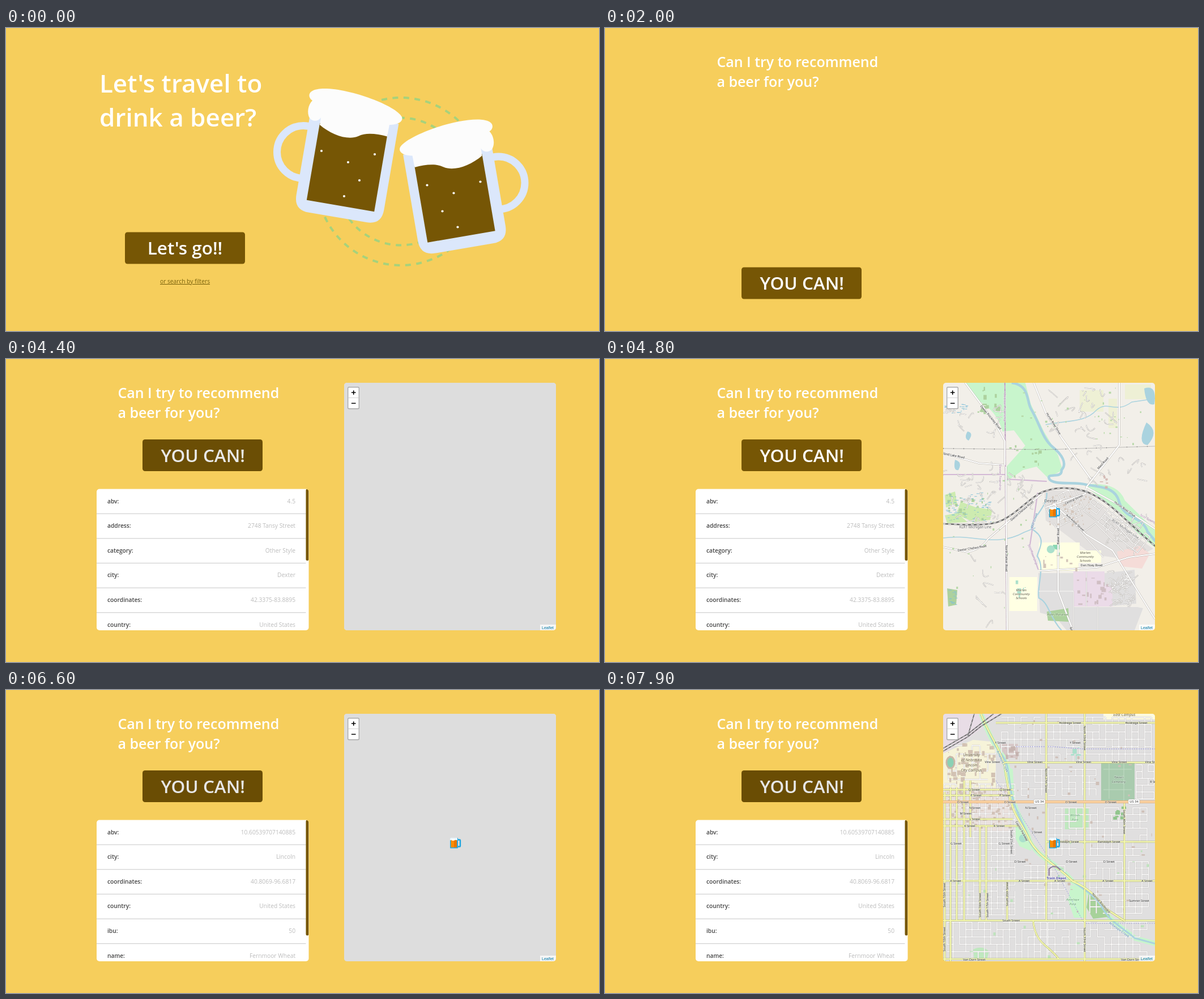
An HTML page that plays this animation: 1047x535 px, repeating every 8 s.

```html
<!DOCTYPE html>
<html lang="en">
<head>
<meta charset="utf-8">
<title>Let's travel to drink a beer?</title>
<style>
html, body { margin: 0; width: 100%; height: 100%; overflow: hidden; background: #f6ce5c; }
svg { display: block; width: 1047px; height: 535px; font-family: "Open Sans", sans-serif; }
.bold { font-weight: 600; }
.map { font-family: "Noto Sans", sans-serif; stroke-linejoin: round; }
.map text { paint-order: stroke; stroke: #fff; stroke-opacity: .65; stroke-width: 1px; text-anchor: middle; }
</style>
</head>
<body>
<svg id="stage" viewBox="0 0 1047 535"></svg>
<script>
const BROWN = '#765605';
const text = (x, y, s, size, fill, attr = '') =>
  `<text x="${x}" y="${y}" font-size="${size}" fill="${fill}" ${attr}>${s}</text>`;
const rect = (x, y, w, h, fill, r = 0, attr = '') =>
  `<rect x="${x}" y="${y}" width="${w}" height="${h}" rx="${r}" fill="${fill}" ${attr}/>`;
const area = (d, fill) => `<path d="${d}" fill="${fill}"/>`;
const line = (d, color, w, attr = '') =>
  `<path d="${d}" fill="none" stroke="${color}" stroke-width="${w}" ${attr}/>`;
const road = (d, w = 2, fill = '#fff', edge = '#b3afaa') => line(d, edge, w + 0.9) + line(d, fill, w);
const label = (x, y, s, angle = 0, fill = '#222', size = 5.3, attr = '') =>
  text(0, 0, s, size, fill, `dy=".35em" transform="translate(${x} ${y}) rotate(${angle})" ${attr}`);
const stack = (x, y, words, fill, size = 6.2, step = 7.5) =>
  words.map((w, i) => label(x, y + i * step, w, 0, fill, size, 'font-style="italic"')).join('');
const group = (id, body, attr = '') => `<g id="${id}" ${attr}>${body}</g>`;

let seed = 11;
const rnd = () => (seed = (seed * 16807) % 2147483647) / 2147483647;
const num = v => v.toFixed(1);

// street grid with random gaps
function grid(x0, y0, x1, y1, dx, dy, gap) {
  let d = '';
  for (let y = y0; y <= y1; y += dy)
    for (let x = x0; x <= x1; x += dx) {
      if (rnd() > gap && x + dx <= x1 + 1) d += `M${num(x)} ${num(y)}h${dx}`;
      if (rnd() > gap && y + dy <= y1 + 1) d += `M${num(x)} ${num(y)}v${dy}`;
    }
  return d;
}

// winding residential lanes
function lanes(x, y, w, h, n) {
  let d = '';
  const r = () => num((rnd() - 0.5) * 32);
  for (let i = 0; i < n; i++)
    d += `M${num(x + rnd() * w)} ${num(y + rnd() * h)}q${r()} ${r()} ${r()} ${r()}`;
  return d;
}

function blocks(x, y, w, h, n, fill, size = 4) {
  let d = '';
  for (let i = 0; i < n; i++) {
    const a = num(1 + rnd() * size), b = num(1 + rnd() * size);
    d += `M${num(x + rnd() * w)} ${num(y + rnd() * h)}h${a}v${b}h-${a}z`;
  }
  return area(d, fill);
}

// short level strokes for wetland
function marsh(x, y, w, h, n) {
  let d = '';
  for (let i = 0; i < n; i++) d += `M${num(x + rnd() * w)} ${num(y + rnd() * h)}h${num(2 + rnd() * 4)}`;
  return line(d, '#7fbfd9', 0.9);
}

function mug() {
  const dots = [[557, 217], [604, 237], [651, 223], [624, 269], [597, 297]];
  return '<circle cx="525" cy="219" r="46.5" fill="none" stroke="#dbe7fb" stroke-width="13"/>' +
    '<g transform="translate(590.5 314) rotate(9.7)">' +
    area('M-80 -160H77V-6Q77 21 50 21H-53Q-80 21 -80 -6Z', '#dbe7fb') +
    rect(-60.5, -138, 121, 138, BROWN) + '</g>' +
    area('M536 122C533 112 545 107 562 107C610 107 690 138 699 157C702 166 690 171 677 171' +
      'L673 191.500C655 187 636 184 622 191C604 199 575 189 554 171L556 158C552 165 541 166 536 159' +
      'C531 150 533 136 541 128C539 127 537 125 536 122Z', '#fcfcfc') +
    dots.map(([x, y]) => `<circle cx="${x}" cy="${y}" r="2.1" fill="#fcfcfc"/>`).join('');
}

const ring = r => `<circle cx="697" cy="271" r="${r}" fill="none" stroke="#a7d27b" stroke-width="4" stroke-dasharray="10 9.5"/>`;

const button = (id, s, x) => group(id, rect(0, 0, 212, 56, BROWN, 4.5) +
  text(x, 39.5, s, 31.5, '#fff', 'class="bold" text-anchor="middle"'));

const home = text(165, 114, "Let's travel to", 44, '#fff', 'class="bold"') +
  text(165, 174, 'drink a beer?', 44, '#fff', 'class="bold"') +
  `<g transform="translate(210 360.5)">${button('go', "Let's go!!", 106)}</g>` +
  text(316, 451, 'or search by filters', 10.24, '#77600a', 'text-anchor="middle" text-decoration="underline"') +
  ring(148) + ring(112.5) + mug() +
  `<g transform="translate(1394.5 54.5) scale(-1 1)">${mug()}</g>`;

function card(rows, thumb) {
  return rows.map(([key, value], i) => {
    const y = 229.5 + i * 43.65;
    return (i ? rect(160, y - 0.6, 369.5, 1.2, '#d0d0d0') : '') +
      text(179, y + 25, key + ':', 10.24, '#444', 'class="bold"') +
      text(511, y + 25, value, 10.24, '#bcbcbc', 'text-anchor="end"');
  }).join('') + rect(529.5, 229.5, 5, thumb, BROWN, 2.5);
}

const firstBeer = [['abv', '4.5'], ['address', '2748 Tansy Street'], ['category', 'Other Style'],
  ['city', 'Dexter'], ['coordinates', '42.3375-83.8895'], ['country', 'United States']];
const secondBeer = [['abv', '10.60539707140885'], ['city', 'Lincoln'], ['coordinates', '40.8069-96.6817'],
  ['country', 'United States'], ['ibu', '50'], ['name', 'Fernmoor Wheat']];

function dexterMap() {
  const water = '#aad3df', park = '#c8f5cc', wood = '#add19e', purple = '#a47fa6', school = '#ffffe3';
  const river = 'M718 42C750 46 744 74 752 88C768 115 772 140 790 155C806 168 817 184 806 196C808 212 780 200 784 211' +
    'C790 224 830 216 850 222C880 226 902 228 908 253C918 284 948 276 958 305L972 322';
  const rail = 'M596 291C630 292 665 295 690 289C720 280 742 252 766 238C790 225 825 225 852 235C892 252 915 282 972 331';
  const main = 'M597 166L660 184L704 187M636 42L688 112L706 145V187M757 42L778 95L806 139L858 212M908 42V152L850 226L848 238' +
    'L778 262M597 332L640 341Q664 336 676 318L730 272L771 238M786 250L850 310L896 338L971 459' +
    'M800 262V410L826 479M708 190L710 479M766 374L868 368L925 350L971 344M850 226L908 258L971 300';
  const small = lanes(604, 65, 90, 70, 14) + lanes(604, 195, 95, 90, 26) + lanes(785, 55, 115, 80, 22) +
    lanes(872, 270, 95, 65, 26) + lanes(885, 375, 55, 65, 34) + lanes(690, 200, 70, 60, 14) +
    lanes(830, 160, 130, 55, 16) + lanes(640, 340, 120, 130, 8);
  const town = (angle, d) => `<g transform="rotate(${angle} 815 262)">${road(d, 1.2)}</g>`;
  return rect(597, 42, 374, 437, '#f2efe9') +
    area('M838 55h42v38h-42zM889 70h15v52h-15zM918 45h46v26h-46z', '#eef0d5') +
    area('M634 42H742L752 80L775 128L800 170L808 196L782 210L762 190L738 196L708 217L707 192L742 153L722 126L702 128Q692 92 660 74Z', park) +
    area('M846 222Q905 215 918 250L971 302V333L945 312L910 275Z', park) +
    area('M776 232L850 232L905 290L968 335L930 355L860 345L800 300L778 285Z', '#e3e0de') +
    area('M765 378H828V438H940L950 440L935 479H815L795 455L768 448Z', '#e0dfdf') +
    area('M827 375H882V400H896V437H827Z', '#ebdbe8') +
    area('M882 378L935 372L938 432L896 436V400H882Z', '#e0dfdf') +
    area('M904 340L945 330L962 344L948 370L910 366Z', '#f5dcd8') +
    area('M766 324h72v14h38v22h-40v14h-70zM714 385h49v60h-49z', school) +
    area('M600 240L618 234L622 258L602 262ZM628 252L655 262L684 266L680 284L650 288L620 274ZM600 276L622 272L640 288L604 290Z', '#cdebb0') +
    area('M604 405L622 408L620 434L606 437ZM780 446L818 440L820 464L782 462Z', wood) +
    blocks(600, 236, 82, 50, 30, wood, 5) + blocks(655, 44, 40, 50, 14, wood, 8) + blocks(712, 150, 60, 40, 12, wood, 5) +
    marsh(598, 236, 82, 52, 75) + marsh(598, 80, 40, 16, 26) + marsh(606, 408, 14, 26, 14) +
    area('M952 52Q975 44 970 80Q955 84 952 52ZM956 112Q980 128 958 152Q938 150 956 112ZM618 178q14 4 6 18q-10 2 -6 -18ZM640 128q12 2 2 16q-9 -4 -2 -16Z', water) +
    line('M778 116C820 108 848 112 868 90C888 72 900 98 930 76L971 70M597 316C650 308 690 334 740 306L760 298', water, 1.5) +
    line('M780 236C782 262 752 280 753 300C782 316 766 335 763 348C778 368 762 400 766 422C784 430 784 455 806 479', water, 2.2) +
    line(river, water, 4.5) +
    blocks(785, 326, 14, 18, 5, '#8bd8b4', 9) + blocks(723, 388, 36, 28, 7, '#aae0cb', 8) +
    '<circle cx="787" cy="336" r="7" fill="#aae0cb"/>' +
    line('M706 42L709 479M597 204H706M706 212L780 216M764 236L750 330L765 372', '#d3b9d5', 2.2) +
    line('M706 42L709 479', '#a783a9', 0.8, 'stroke-dasharray="5 2 1 2"') +
    line('M597 158L780 160L971 154', '#999', 0.6) + line('M597 158L780 160L971 154', '#777', 1.6, 'stroke-dasharray="1 17"') +
    road(small, 1) +
    town(-27, grid(782, 236, 842, 286, 10, 10, 0.2)) + town(38, grid(842, 212, 965, 248, 11, 9, 0.25)) +
    road('M838 303L880 350M866 290L916 340M866 290L846 305M890 276L932 326M766 410H827V479M850 375V437M870 437V479', 1.3) +
    road(main, 2.2) +
    blocks(780, 240, 75, 52, 55, '#d3c5ba', 3) + blocks(832, 380, 56, 54, 22, '#d0bfc4', 7) +
    blocks(772, 345, 60, 25, 9, '#d3c5ba', 7) + blocks(872, 205, 16, 20, 8, '#d3b6b0', 5) +
    blocks(735, 50, 210, 100, 34, '#b7d9a8', 3) + blocks(600, 200, 150, 245, 28, '#b7d9a8', 3) +
    line(rail, '#707070', 2.6) + line(rail, '#fff', 1.2, 'stroke-dasharray="5 5"') +
    label(706, 85, 'Webster Township', 90, purple, 5.8) + label(698, 209, 'Dexter Township', 90, purple, 5.8) +
    label(755, 345, 'Scio Township', 68, purple, 5.8) + label(962, 284, 'Scio Township', 28, purple, 5.8) +
    label(681, 103, 'Dexter Pinckney Road', 50) + label(792, 114, 'Huron River Drive', 58) +
    label(879, 184, 'Mast Road', -47) + label(614, 170, 'Island Lake Road', 11) +
    label(828, 248, 'Central Street', -25) + label(830, 289, 'Ann Arbor Street', 43) +
    label(736, 268, 'Dexter Chelsea Road', -41) + label(648, 334, 'Dexter Chelsea Road', -9) +
    label(654, 297, 'KLRT Michigan Line', 0, '#666', 6.2) + label(919, 300, 'KLRT Michigan Line', 35, '#666', 6.2) +
    label(758, 285, 'Mill Creek', -72, '#4f80a5', 6) + label(800, 313, 'Baker Road', -90) +
    label(709, 352, 'North Parker Road', 90) + label(859, 364.5, 'Dan Hoey Road') +
    label(918, 265, 'Huron River Drive', 35) + label(829, 486, 'Baker Road', 60) +
    label(787, 250, 'Dexter', 0, '#555', 7.4) +
    stack(848, 342, ['Marlen', 'Community', 'Schools'], '#5f5b38', 5.9, 7) +
    stack(735, 408, ['Marlen', 'Community', 'Schools'], '#5f5b38', 5.9, 7) +
    stack(799, 451, ['Alder Preserve'], '#4d7a3c', 5.9);
}

function lincolnMap() {
  const park = '#c8f5cc', water = '#aad3df', yellow = '#f4f8ae', edge = '#aeb265';
  const creek = 'M664 42C676 74 686 96 700 114C716 132 712 165 720 192C727 222 742 238 750 268C766 298 800 306 826 338' +
    'C845 352 868 364 880 388C895 412 920 424 935 438L972 448';
  const parkway = 'M718 200C722 222 740 240 750 266C768 298 800 310 826 338C850 348 866 362 884 386L918 408';
  const rail = 'M597 108L640 83L664 64L700 42M597 103L640 78L686 42M640 83L652 42';
  const row = (y, s, ...xs) => xs.map(x => label(x, y, s)).join('');
  const up = (s, x, y, a = -90) => label(x, y, s, a);
  const shield = x => rect(x - 10, 193, 20, 8.5, '#fff', 1.5, 'stroke="#aaa" stroke-width=".5"') + label(x, 197.3, 'US 34', 0, '#333', 5.8);
  return rect(597, 42, 374, 437, '#e0dfdf') +
    area('M597 42H700L640 86L597 112Z', '#e8dde6') + area('M597 112L650 88L690 92V172H597Z', '#f6f3d9') +
    area('M597 172H718V250H597Z', '#eae1de') + area('M880 42H971V52H880Z', '#fdfbe0') +
    area('M697 95h32v25h-32z', '#d7c8c8') +
    line(creek, park, 9) +
    area('M702 130L720 140L722 175L708 165ZM724 236L744 250L752 284L732 276L722 256ZM822 344L850 352V402H828L818 372Z', park) +
    area('M812 207h42v39h-42zM650 458q18 -8 28 4l-4 14h-22z', '#bfe8bf') +
    area('M854 360L878 376L892 400L862 404L850 384Z', '#a7d29a') +
    area('M876 129h59v68h-59z', '#a9cbae') + line('M880 140h50M890 130v62M880 176h50M916 130v66', '#c1dcc4', 1) +
    road(grid(599, 166, 733, 404, 10.4, 10.5, 0.1) + grid(604, 410, 780, 474, 11, 13, 0.16) +
      grid(700, 48, 968, 125, 11.5, 13, 0.2) + grid(735, 140, 872, 196, 12, 11.5, 0.18) +
      grid(782, 208, 968, 300, 12.5, 12, 0.24) + grid(856, 303, 968, 404, 11.5, 11.4, 0.2) +
      grid(782, 410, 968, 474, 12.5, 13, 0.2) + grid(740, 310, 812, 404, 12, 10.5, 0.18) +
      grid(938, 132, 970, 194, 10.5, 12, 0.2) + grid(606, 98, 690, 160, 14, 15, 0.4), 1.4, '#fff', '#bfbcb9') +
    blocks(600, 92, 88, 74, 65, '#d2c2b3', 8) + blocks(600, 172, 118, 74, 110, '#d2c2b8', 5) +
    blocks(700, 96, 26, 22, 8, '#c6b4b0', 9) + blocks(720, 48, 245, 140, 26, '#cfc0b8', 5) +
    blocks(730, 210, 235, 190, 26, '#cfc0b8', 5) + blocks(610, 260, 350, 210, 26, '#bfe3bd', 5) +
    blocks(897, 203, 18, 24, 9, '#91c58d', 8) +
    '<ellipse cx="610" cy="128" rx="7" ry="10" fill="#8bd0b4" stroke="#c9b7a8" stroke-width="3"/>' +
    '<circle cx="738" cy="262" r="7" fill="#aae0cb"/>' + blocks(822, 100, 18, 14, 5, '#aae0cb', 9) +
    line('M726 100H790L842 104H971', '#8d8dde', 1, 'stroke-dasharray="2 2"') +
    line('M690 160L724 206L786 300L846 412H971', '#9a9ae0', 0.9, 'stroke-dasharray="2 2"') +
    line(creek, water, 3) +
    road('M690 58H971M700 128H971M597 176H720M597 186H720M597 228H720M597 240H732M780 268H971' +
      'M597 337H971M597 407H971M597 475H971M779 42V407M847 42V479M917 198V407M600 180V479' +
      'M610 172V479M621 172V407M634 160V407M645 160V260M662 240V407M673 240V407M710 337V407' +
      'M756 407Q758 435 776 450T802 476', 2.1, yellow, edge) +
    road(parkway, 2.6, yellow, edge) +
    road('M664 42C676 80 704 108 708 150L716 200', 2.4, yellow, edge) +
    road('M597 197.5H971', 3.6, '#fbd2a2', '#d69a5c') +
    line(rail, '#686868', 1.7) + line(rail, '#ddd', 0.7, 'stroke-dasharray="4 4"') +
    line('M784 328V316Q794 306 804 318', '#8e7a9d', 2) +
    row(58, 'Holdrege Street', 821, 938) + row(93, 'Y Street', 698, 830) +
    row(127.5, 'Vine Street', 684, 759, 845, 908, 967) + row(176, 'Q Street', 652, 707) +
    row(186, 'P Street', 655, 706) + row(198, 'O Street', 632, 715, 823, 893) +
    row(208, 'N Street', 653, 752) + row(218, 'M Street', 637) + row(228, 'L Street', 653) +
    row(240, 'K Street', 644, 696) + row(251, 'J Street', 763) + row(271, 'G Street', 620, 705) +
    row(268, 'Randolph Street', 817, 890) + row(303, 'D Street', 733, 824, 890) +
    row(337, 'A Street', 619, 740, 803, 888, 957) + row(372, 'Sumner Street', 943) +
    row(407, 'South Street', 717) + row(476, 'Van Dorn Street', 652, 931) + row(162, 'R Street', 972) +
    up('North 27th Street', 779, 160, 90) + up('North 33rd Street', 847, 85, 90) +
    up('South 40th Street', 917, 233, 90) + up('South 33rd Street', 847, 441, 90) +
    up('South 21st Street', 718, 268, 90) + up('South 10th Street', 599.5, 362) +
    up('South 10th Street', 599.5, 440) + up('South 16th Street', 662, 380) +
    up('South 17th Street', 675, 380) + up('South 20th Street', 710, 360) +
    label(736, 249, 'Capitol Parkway', 60) + label(876, 376, 'Normal Boulevard', 48) +
    label(702, 126, 'Antelope Creek', 65, '#4f80a5', 5.8) + label(908, 423, 'Antelope Creek', 36, '#4f80a5', 6) +
    shield(767) + shield(934) +
    stack(647, 115, ['University', 'of Nebraska', 'Lincoln', 'City Campus'], '#665a35', 6.8, 9) +
    stack(917, 44, ['East Campus'], '#665a35', 6.8) +
    stack(907, 154, ['Tavuri', 'Cemetery'], '#3f5f46', 5.9) +
    stack(830, 221, ['Woods', 'Park'], '#4b9a58', 5.9) + stack(826, 370, ['Antelope', 'Park'], '#4b9a58', 5.9) +
    label(797, 332, 'Train Depot', 0, '#4a45a5', 6, 'font-weight="600"');
}

const pin = rect(796, 264.5, 6, 12, 'none', 1, 'stroke="#1fa5de" stroke-width="2.4"') +
  rect(784, 261, 14, 18.5, '#27a9e1', 1) + rect(784, 261, 13, 4.5, '#eaf6fc', 1) +
  rect(785.5, 265, 10.5, 13, '#ff8c00') + rect(791, 265, 5, 13, '#e87500') + rect(787, 263, 5, 3, '#fff', 1);

const controls = rect(603, 49, 21, 39.5, '#aaa', 2.5) + rect(604.4, 50.4, 18.2, 36.7, '#fff', 1.3) +
  rect(604.4, 68, 18.2, 0.8, '#ccc') + line('M609.9 59.2h7.6M613.7 55.4v7.6M609.9 78.2h7.6', '#000', 1.6) +
  rect(943, 469, 28, 10, '#fff', 0, 'fill-opacity=".75"') +
  text(946, 476.6, 'Leaflet', 7, '#0078a8', 'font-family="Liberation Sans, Arial, sans-serif"');

const stage = document.getElementById('stage');
stage.innerHTML =
  `<clipPath id="mapClip">${rect(597, 42, 374, 437, '#000', 5)}</clipPath>` +
  `<clipPath id="cardClip">${rect(160, 229.5, 374.5, 249.5, '#000', 5)}</clipPath>` +
  rect(0, 0, 1047, 535, '#f6ce5c') +
  group('home', home) +
  group('ask', text(197.4, 69, 'Can I try to recommend', 25, '#fff', 'class="bold"') +
    text(197.4, 103.5, 'a beer for you?', 25, '#fff', 'class="bold"') +
    group('slot', button('can', 'YOU CAN!', 106.8))) +
  group('result',
    `<g clip-path="url(#cardClip)">${rect(160, 229, 375, 250, '#fff')}` +
    group('first', card(firstBeer, 126.5)) + group('second', card(secondBeer, 204)) + '</g>' +
    '<g clip-path="url(#mapClip)">' +
    group('dexter', dexterMap(), 'class="map"') + group('lincoln', lincolnMap(), 'class="map"') +
    rect(597, 42, 201, 219, '#ddd', 0, 'id="tileA"') + rect(597, 261, 201, 218, '#ddd', 0, 'id="tileB"') +
    rect(798, 42, 173, 437, '#ddd', 0, 'id="tileC"') +
    group('pin', pin) + controls + '</g>');

const el = id => document.getElementById(id);
const show = (id, on) => { el(id).style.display = on ? '' : 'none'; };
const ramp = (t, a, b) => Math.min(1, Math.max(0, (t - a) / (b - a)));

function hoverLight(t) {
  if (t < 3400) return 1;
  if (t < 4400) return 0.94;
  if (t < 6000) return 0.91 + 0.09 * ramp(t, 4400, 4800);
  return t < 6200 ? 0.95 : 0.9;
}

function draw(ms) {
  const t = Math.floor((ms % 8000) / 100) * 100;
  const next = t >= 6600;
  show('home', t < 2000);
  show('ask', t >= 2000);
  show('result', t >= 4400);
  show('first', !next);
  show('dexter', !next);
  show('second', next);
  show('lincoln', next);
  show('pin', t > 4400);
  el('slot').setAttribute('transform', `translate(241 ${t < 4400 ? 422.5 : 142})`);
  el('go').style.filter = `brightness(${1 - 0.1 * ramp(t, 400, 600)})`;
  el('can').style.filter = `brightness(${hoverLight(t)})`;
  const fade = (id, a, b) => el(id).setAttribute('opacity', 1 - (next ? ramp(t, a, b) : ramp(t, 4400, 4800)));
  fade('tileA', 6600, 7000);
  fade('tileB', 7000, 7400);
  fade('tileC', 7600, 7900);
}

const start = performance.now();
function tick() {
  draw(performance.now() - start);
  requestAnimationFrame(tick);
}
tick();
</script>
</body>
</html>
```
